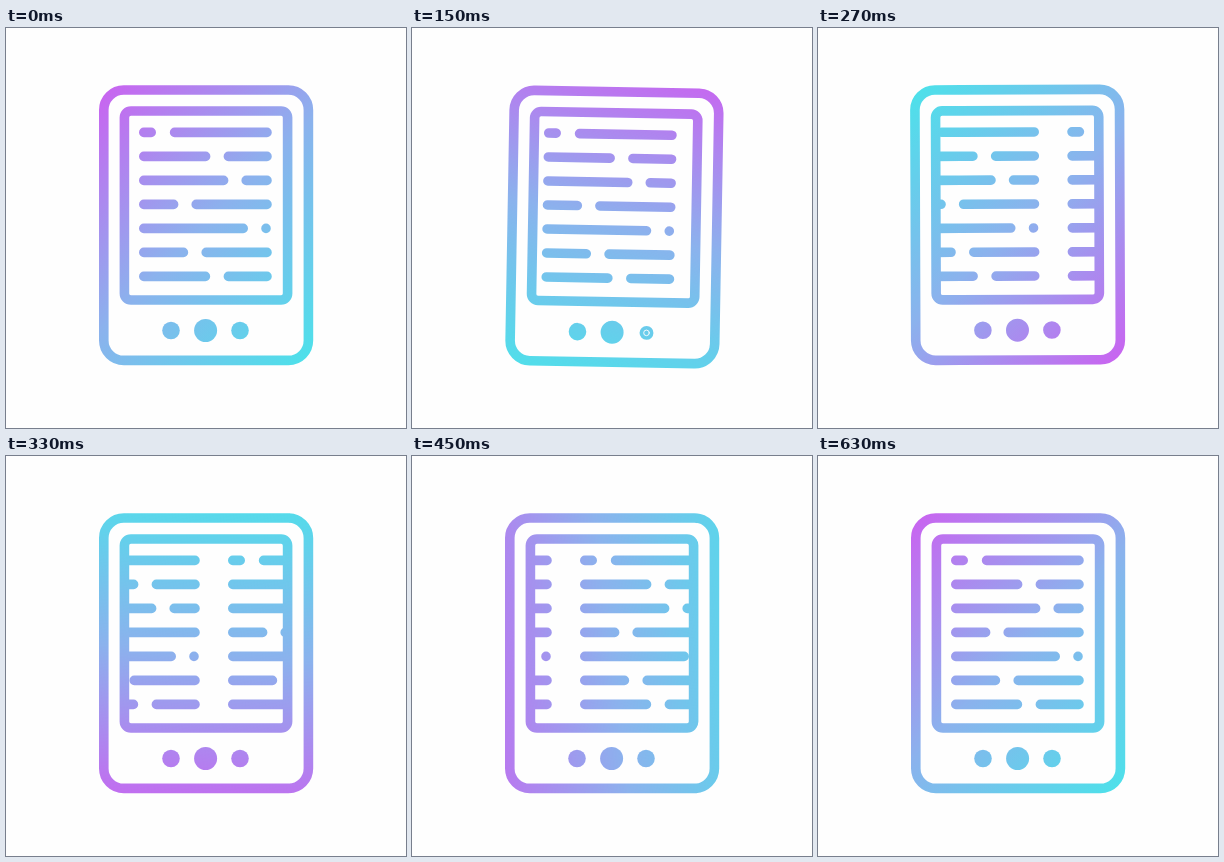
Recreate the animation shown at these times as an HTML page without scripts. Size 400x400 px, loop 2.66 s.

```html
<!DOCTYPE html>
<html lang="en">
<head>
<meta charset="utf-8">
<title>E-reader page turn</title>
<style>
html, body { margin: 0; width: 100%; height: 100%; overflow: hidden; background: #fefefe; }
svg { display: block; width: 100vw; height: 100vh; }

.tilt, .page, .spin, .press, .ring { animation: 2660ms steps(2, end) infinite; }
.tilt { animation-name: tilt; transform-origin: 98px 332px; }
.page { animation-name: page; }
.spin { animation-name: spin; transform-origin: 200px 197px; }
.press { animation-name: press; transform-origin: 234px 302.5px; }
.ring { animation-name: ring; }

/* every segment is cut into 30 ms steps */
@keyframes tilt {
  0% { transform: rotate(0deg); animation-timing-function: steps(3, end); }
  3.383% { transform: rotate(3deg); animation-timing-function: steps(4, end); }
  7.894% { transform: rotate(-1deg); }
  10.15% { transform: rotate(-.2deg); animation-timing-function: step-end; }
  11.278%, 100% { transform: rotate(0deg); }
}
@keyframes page {
  0%, 3.383% { transform: translateX(0); }
  5.639% { transform: translateX(-5px); }
  7.894% { transform: translateX(-21px); }
  10.15% { transform: translateX(-44px); }
  12.406% { transform: translateX(-72px); }
  14.661% { transform: translateX(-99.8px); }
  16.917% { transform: translateX(-126px); }
  19.172% { transform: translateX(-147px); }
  21.428% { transform: translateX(-158.5px); }
  23.684%, 100% { transform: translateX(-161px); }
}
@keyframes spin {
  0% { transform: rotate(0deg); animation-timing-function: step-end; }
  1.127% { transform: rotate(4deg); }
  3.383% { transform: rotate(28deg); }
  5.639% { transform: rotate(60deg); }
  7.894% { transform: rotate(118deg); }
  10.15% { transform: rotate(182deg); }
  12.406% { transform: rotate(230deg); }
  14.661% { transform: rotate(270deg); }
  16.917% { transform: rotate(308deg); }
  19.172% { transform: rotate(339deg); }
  21.428% { transform: rotate(355deg); }
  23.684%, 100% { transform: rotate(360deg); }
}
@keyframes press {
  0% { transform: scale(1); animation-timing-function: steps(3, end); }
  3.383% { transform: scale(.6); }
  5.639% { transform: scale(.79); animation-timing-function: steps(3, end); }
  9.022%, 100% { transform: scale(1); }
}
@keyframes ring {
  0%, 1.127% { stroke-width: 0; animation-timing-function: step-end; }
  2.255% { stroke-width: 1.9px; animation-timing-function: step-end; }
  3.383% { stroke-width: 3px; }
  5.639% { stroke-width: .9px; animation-timing-function: step-end; }
  6.766%, 100% { stroke-width: 0; }
}
</style>
</head>
<body>
<svg viewBox="0 0 400 400">
  <defs>
    <linearGradient id="hue" gradientUnits="userSpaceOnUse" x1="82" y1="79" x2="318" y2="315">
      <stop offset="0" stop-color="#c865f0"/>
      <stop offset=".5" stop-color="#8bb2ed"/>
      <stop offset="1" stop-color="#4ee0ea"/>
    </linearGradient>
    <clipPath id="screen"><rect x="119" y="83" width="162" height="189"/></clipPath>
    <path id="text" d="M137.8 104.4H145.2M168.6 104.4H261
      M137.8 128.4H199.6M222.4 128.4H261
      M137.8 152.4H217.6M240.2 152.4H261
      M137.8 176.4H167.6M190.2 176.4H261
      M137.8 200.4H237.2M260 200.4h.01
      M137.8 224.4H177.4M200.2 224.4H261
      M137.8 248.4H199.4M222.4 248.4H261"/>
    <mask id="reader" maskUnits="userSpaceOnUse" x="0" y="0" width="400" height="400">
      <g class="tilt" fill="none" stroke="#fff" stroke-width="9.6" stroke-linecap="round">
        <rect x="97.8" y="62" width="204.6" height="270.4" rx="20"/>
        <rect x="118.4" y="83" width="163.2" height="189" rx="6.5"/>
        <g clip-path="url(#screen)">
          <g class="page">
            <use href="#text"/>
            <use href="#text" x="161"/>
          </g>
        </g>
        <g fill="#fff" stroke="none">
          <circle cx="165" cy="302.5" r="8.8"/>
          <circle cx="199.6" cy="302.5" r="11.5"/>
          <circle class="press" cx="234" cy="302.5" r="8.8"/>
        </g>
        <circle class="ring" cx="234" cy="302.5" r="2.8" stroke="#000" stroke-width="0"/>
      </g>
    </mask>
  </defs>
  <g mask="url(#reader)">
    <rect class="spin" x="-100" y="-103" width="600" height="600" fill="url(#hue)"/>
  </g>
</svg>
</body>
</html>
```
